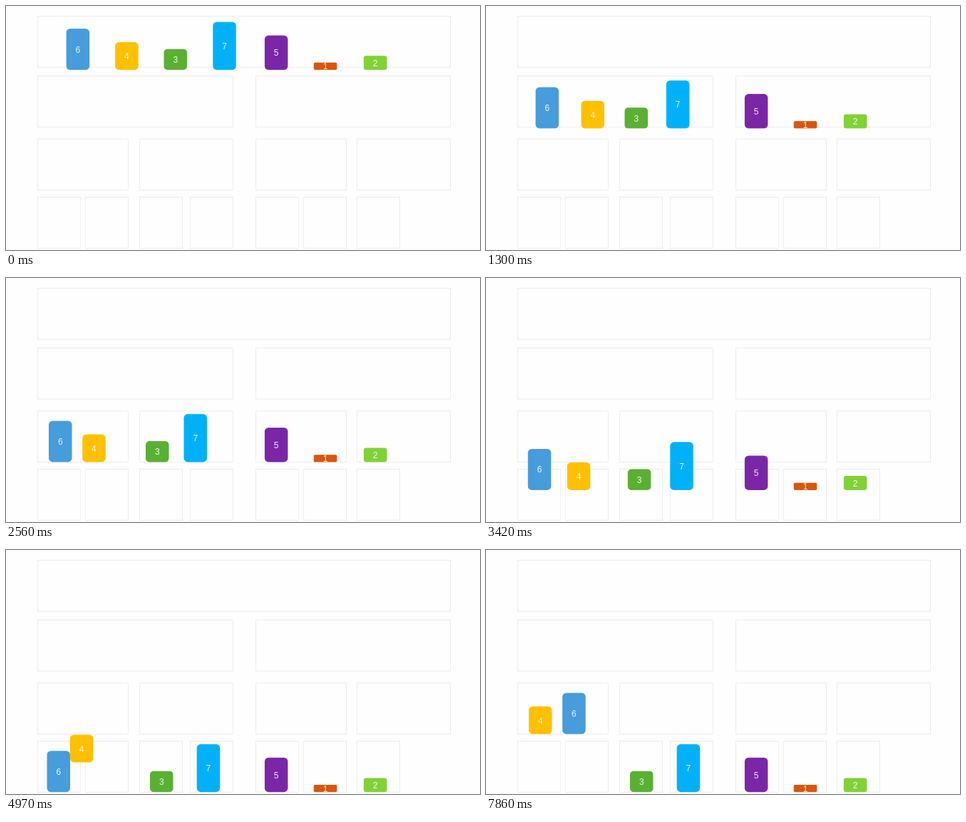
Write an HTML page that moves like this. It is 665x344 px and loops after 7.99 s.

```html
<!DOCTYPE html>
<html lang="en">
<head>
<meta charset="utf-8">
<title>Merge sort blocks</title>
<style>
  html, body { margin: 0; width: 100%; height: 100%; overflow: hidden; background: #fefefe; }
  svg { display: block; width: 665px; height: 344px; }
  .slot { fill: none; stroke: #ededed; stroke-width: 1; }
  text { font: 12px "Liberation Sans", Arial, sans-serif; fill: #fff; fill-opacity: .9; text-anchor: middle; }
</style>
</head>
<body>
<svg id="stage" viewBox="0 0 665 344"></svg>
<script>
const LOOP = 7990, SPAN = 1220;
const BLOCK = 32.5, SLOT = 72;
const stage = document.getElementById("stage");

// Rows of slots: top, width of a left half, width of a right half
const rows = [
  { top: 14.5 },
  { top: 98.8, left: 274, right: 273 },
  { top: 187.7, left: 127, right: 131 },
  { top: 269.5, left: 60, right: 60 }
];
const floor = row => rows[row].top + SLOT - 0.3;

// Left edge of each block in every row; a single value falls straight down
const blocks = [
  { n: 6, fill: "#479cdb", path: [85.3, 69.8, 60, 57.5] },
  { n: 4, fill: "#ffc000", path: [154, 134.1, 107.2, 121] },
  { n: 3, fill: "#5ab032", path: [222.8, 194.5, 196, 202] },
  { n: 7, fill: "#00b1f8", path: [292, 253, 249.5, 267.7] },
  { n: 5, fill: "#7a26a6", path: [362.9] },
  { n: 1, fill: "#d8560f", path: [431.8] },
  { n: 2, fill: "#80d235", path: [501.9] }
];

function add(tag, attrs, parent = stage) {
  const el = document.createElementNS("http://www.w3.org/2000/svg", tag);
  for (const key in attrs) el.setAttribute(key, attrs[key]);
  return parent.appendChild(el);
}

// Draw a slot and its halves; the eighth leaf stays empty
let leaves = 0;
function split(left, right, row = 0) {
  const leaf = row === rows.length - 1;
  if (leaf && ++leaves > blocks.length) return;
  add("rect", { class: "slot", x: left, y: rows[row].top, width: right - left, height: SLOT });
  if (leaf) return;
  const next = rows[row + 1];
  split(left, left + next.left, row + 1);
  split(right - next.right, right, row + 1);
}
split(44.5, 623.5);

for (const b of blocks) {
  const height = 0.7 + 9.55 * b.n;
  b.g = add("g", {});
  add("rect", { y: -height, width: BLOCK, height, rx: Math.min(BLOCK, height) / 6, fill: b.fill }, b.g);
  add("text", { x: BLOCK / 2, y: 4.6 - height / 2 }, b.g).textContent = b.n;
  // Three splitting moves
  b.stops = rows.map((_, row) => ({ x: b.path[row] ?? b.path[0], y: floor(row) }));
  b.starts = [-250, 1108, 2718];
}

// Merging: the first pair rises one row and trades places
function lift(block, place, start) {
  block.stops.push({ x: place.path[2], y: floor(2) });
  block.starts.push(start);
}
lift(blocks[1], blocks[0], 4247);
lift(blocks[0], blocks[1], 6356);

function ease(t, start) {
  const u = Math.min(1, Math.max(0, (t - start) / SPAN)) ** 1.3;
  return u * u * (3 - 2 * u);
}

function draw(t) {
  for (const { g, stops, starts } of blocks) {
    let { x, y } = stops[0];
    starts.forEach((start, i) => {
      const p = ease(t, start);
      x += p * (stops[i + 1].x - x);
      y += p * (stops[i + 1].y - y);
    });
    g.setAttribute("transform", `translate(${x.toFixed(2)} ${y.toFixed(2)})`);
  }
}

function tick() {
  draw(performance.now() % LOOP);
  requestAnimationFrame(tick);
}
tick();
</script>
</body>
</html>
```
